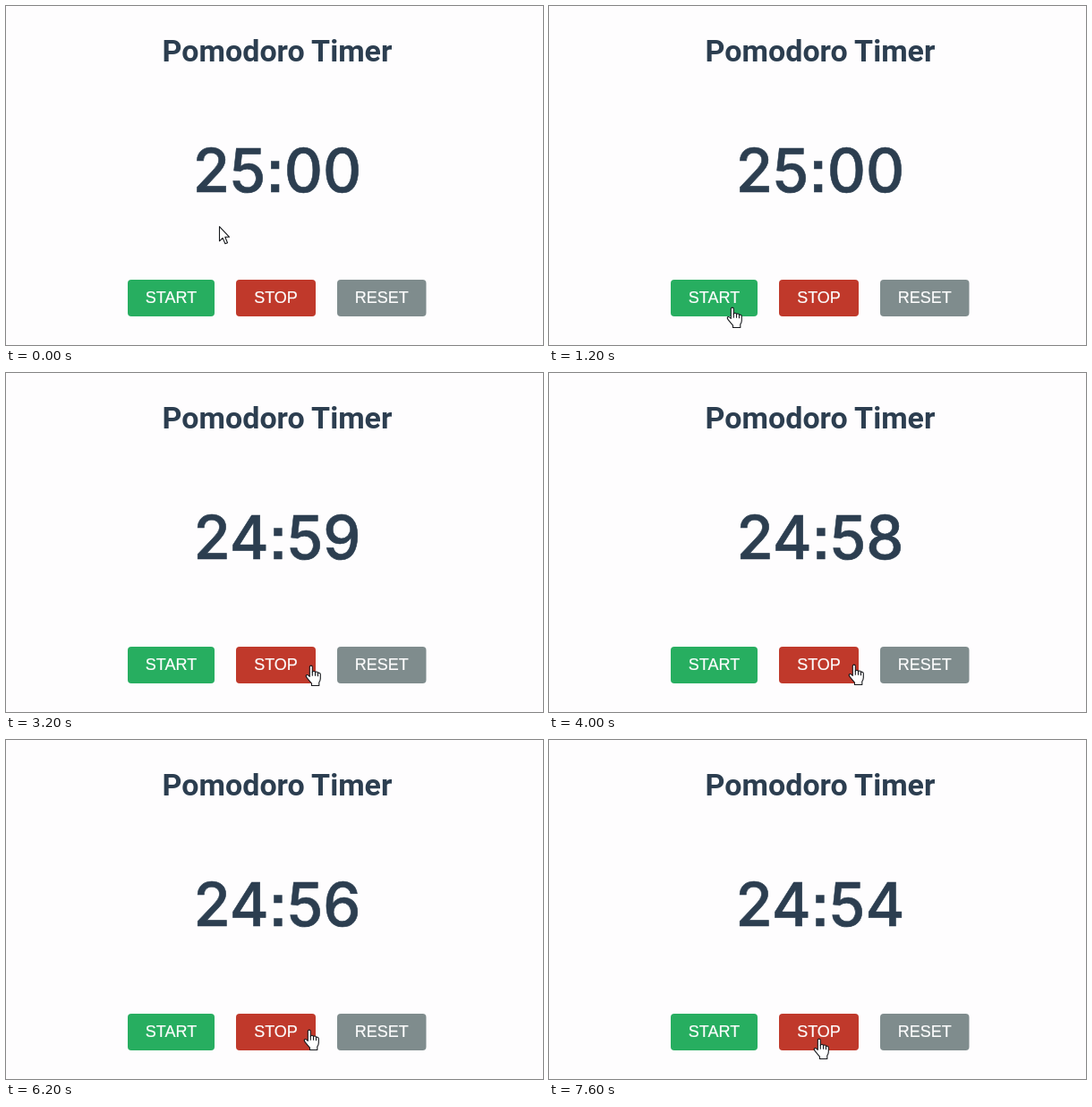
Recreate the animation shown at these times as an HTML page. Size 600 px wide and 379 px high, loop 8000 ms.

```html
<!DOCTYPE html>
<html lang="en">
<head>
<meta charset="utf-8">
<title>Pomodoro Timer</title>
<style>
  html, body { margin: 0; width: 100%; height: 100%; overflow: hidden; background: #fefdfe; }
  svg { display: block; width: 600px; height: 379px; }
  text { text-anchor: middle; fill: #2c3e50; }
  .title { font: 700 34px Roboto, sans-serif; }
  .clock {
    font: 500 67px Inter, sans-serif;
    font-feature-settings: "calt" 0, "ss07" 1;
    stroke: #2c3e50;
    stroke-width: .6;
  }
  .button text {
    font: 18px "Liberation Sans", Arial, sans-serif;
    fill: #fdfdfd;
    stroke: #fdfdfd;
    stroke-width: .2;
  }
  .cursor { fill: #fff; stroke: #16181c; stroke-width: 1.1; stroke-linejoin: round; stroke-linecap: round; }
</style>
</head>
<body>
<svg viewBox="0 0 600 379">
  <text class="title" x="303" y="62.4">Pomodoro Timer</text>
  <text class="clock" id="clock" x="303" y="208">25:00</text>
  <g class="button">
    <rect x="136" y="306" width="97" height="41" rx="4" fill="#27ae60"/>
    <text x="184.5" y="332">START</text>
  </g>
  <g class="button">
    <rect x="257" y="306" width="89" height="41" rx="4" fill="#c0392b"/>
    <text x="301.5" y="332">STOP</text>
  </g>
  <g class="button">
    <rect x="370" y="306" width="99.5" height="41" rx="4" fill="#7f8c8d"/>
    <text x="419.7" y="332">RESET</text>
  </g>
  <path class="cursor" id="arrow" d="M.5 .7V16.8L4.1 13.4L6.9 19.8L9.5 18.7L6.8 12.3H11.6Z"/>
  <g class="cursor" id="hand">
    <path d="M4.3 13.3V2.8Q4.3 1.1 5.8 1.1T7.3 2.8V8.6Q7.6 7.3 9 7.3T10.5 8.9Q10.8 7.9 12.1 8T13.5 9.7Q13.8 8.9 15 9.2T16.3 10.9V15.5Q16.3 17.9 14.8 19.9V23.5H6.5V21.1L1.3 14.9Q-.4 12.8 .7 11.7Q2 10.8 4.3 13.3Z"/>
    <path fill="none" d="M7.3 8.6V12.3M10.5 8.9V12.3M13.5 9.7V12.7"/>
  </g>
</svg>
<script>
  const LOOP = 8000, STEP = 100, HOVER = 300, FIRST_TICK = 2400;

  // Cursor key points: [ms, x, y]
  const path = [
    [0, 238, 246], [300, 287, 323], [400, 287, 323],
    [800, 180, 314], [1000, 180, 314], [1200, 199, 336],
    [2300, 199, 336], [2400, 237, 340], [2600, 285, 348], [3200, 335, 326],
    [7000, 333, 322], [7400, 333, 322], [7600, 296, 333]
  ];

  const [clock, arrow, hand] = ["clock", "arrow", "hand"].map(id => document.getElementById(id));

  function cursorAt(t) {
    const i = path.findLastIndex(p => p[0] <= t);
    const [t0, ...from] = path[i];
    const [t1, ...to] = path[i + 1] || path[i];
    const k = t1 > t0 ? (t - t0) / (t1 - t0) : 0;
    return from.map((v, n) => Math.round(v + (to[n] - v) * k));
  }

  function draw(t) {
    const left = 1500 - Math.max(0, Math.floor((t - FIRST_TICK) / 1000) + 1);
    clock.textContent = Math.floor(left / 60) + ":" + String(left % 60).padStart(2, "0");

    const cursor = t < HOVER ? arrow : hand;
    for (const c of [arrow, hand]) c.style.display = c === cursor ? "" : "none";
    cursor.setAttribute("transform", `translate(${cursorAt(t)})`);
  }

  const start = performance.now();
  function frame() {
    const t = (performance.now() - start) % LOOP;
    draw(Math.floor(t / STEP) * STEP);
    requestAnimationFrame(frame);
  }
  frame();
</script>
</body>
</html>
```
